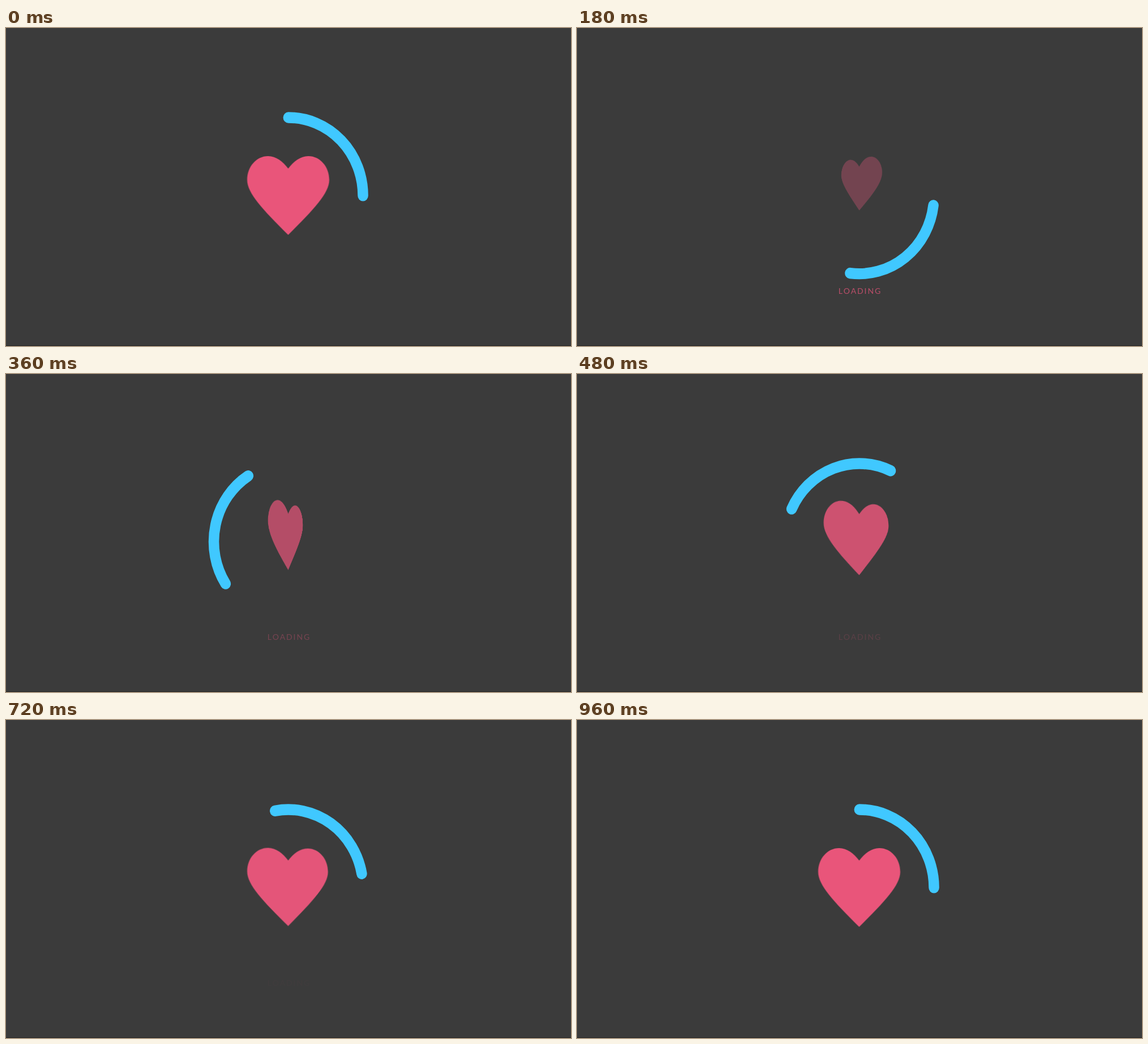
Recreate the animation shown at these times as an HTML page. Size 998 px wide and 561 px high, loop 0.99 s.

```html
<!DOCTYPE html>
<html lang="en">
<head>
<meta charset="utf-8">
<title>Loading heart</title>
<style>
  html, body { margin: 0; width: 100%; height: 100%; overflow: hidden; background: #3b3b3b; }
  svg { position: absolute; left: 0; top: 0; overflow: visible; }
  #heart { transform-origin: 0 0; fill: #e9557a; }
  #ring { fill: none; stroke: #40c8ff; stroke-width: 19.4; stroke-linecap: round; }
  #label { font: 14px Lato, sans-serif; font-kerning: none; letter-spacing: 1.85px; fill: #e9557a; }
</style>
</head>
<body>
<svg width="998" height="561">
  <rect y="560" width="998" height="1" fill="#262626"/>
  <g transform="translate(498.8 295.8) scale(.956 1)">
    <path id="ring" d="M0 -137.8A137.8 137.8 0 0 1 137.8 0"/>
  </g>
  <text id="label" x="461.7" y="469">LOADING</text>
</svg>
<svg id="heart" width="1" height="1">
  <path d="M0 -48C-9.5 -60.5 -21.5 -70 -35.5 -70C-56.5 -70 -72.5 -51 -72.5 -28C-72.5 -5 -45.5 24 0 69
           C45.5 24 72.5 -5 72.5 -28C72.5 -51 56.5 -70 35.5 -70C21.5 -70 9.5 -60.5 0 -48Z"/>
</svg>
<script>
const LOOP = 990, STEP = 30, HOLD = 60, DELAY = 12, DURATION = 900;
const [ring, label, heart] = ['ring', 'label', 'heart'].map(id => document.getElementById(id));

const bezier = (a, b, s) => 3 * a * s * (1 - s) ** 2 + 3 * b * s * s * (1 - s) + s ** 3;

// cubic-bezier(.25, .13, .27, 1)
function ease(x) {
  let lo = 0, hi = 1;
  for (let i = 0; i < 24; i++) {
    const mid = (lo + hi) / 2;
    if (bezier(.25, .27, mid) < x) lo = mid; else hi = mid;
  }
  return bezier(.13, 1, lo);
}

function draw(ms) {
  const t = Math.floor((ms % LOOP + .5) / STEP) * STEP % LOOP;
  // The finished pose is held briefly at the start of the loop.
  const p = t < HOLD ? 1 : Math.min(1, (t - DELAY) / DURATION);
  const turn = p === 1 ? 1 : ease(p);
  const left = 1 - turn;
  const grow = turn ** .87;
  const flip = 180 * left * (.94 + .15 * left);

  ring.setAttribute('transform', `rotate(${360 * turn})`);
  label.style.opacity = left;
  heart.style.opacity = grow;
  heart.style.transform = `translate(498.5px, 238px) scale(${.5 + .5 * grow}) ` +
    `translateY(58px) perspective(400px) rotateY(${flip}deg)`;
}

const start = performance.now();
function tick() {
  draw(performance.now() - start);
  requestAnimationFrame(tick);
}
tick();
</script>
</body>
</html>
```
